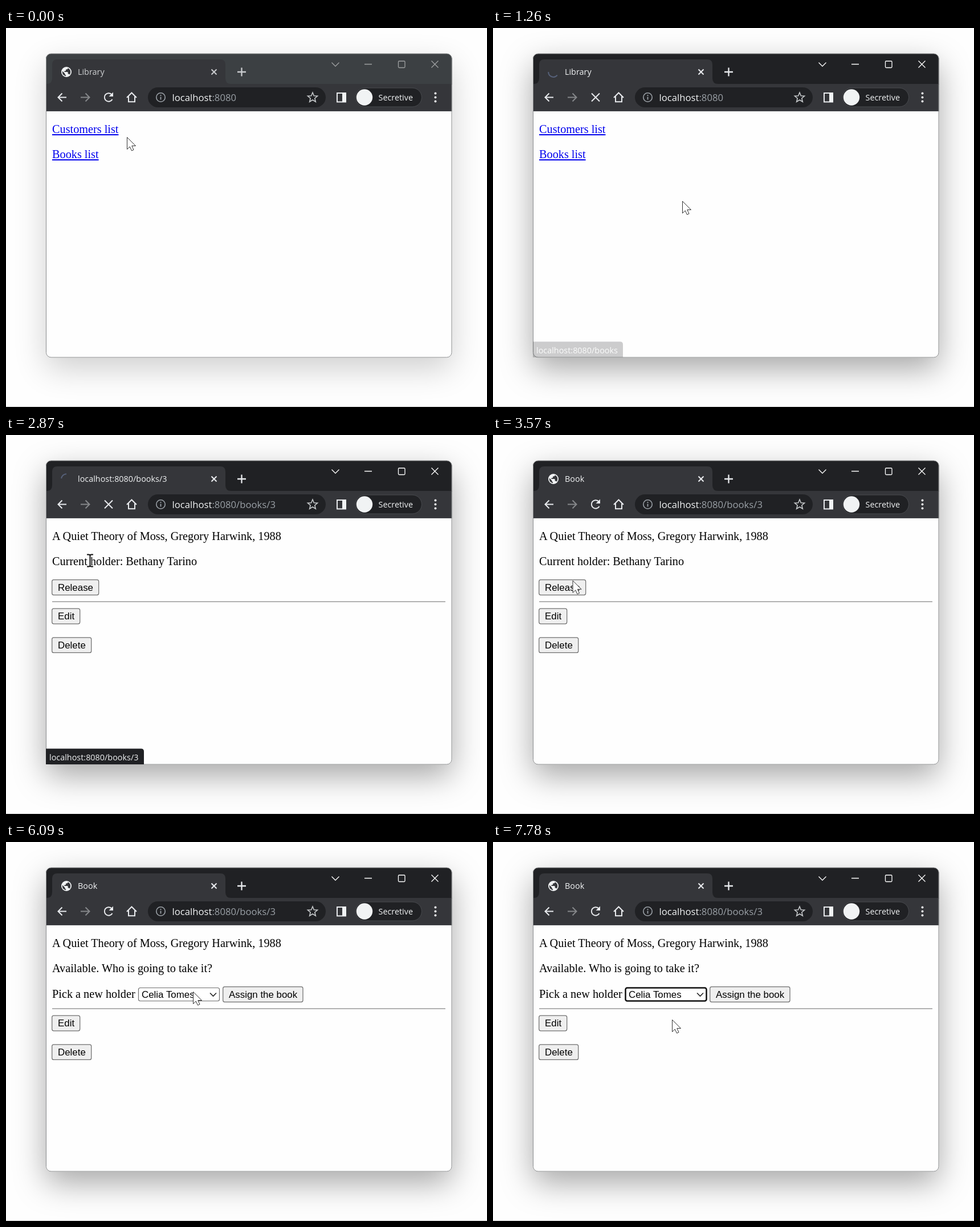
Write an HTML page that moves like this. It is 844 by 664 pixels and loops after 8 s.

```html
<!DOCTYPE html>
<html lang="en">
<head>
<meta charset="utf-8">
<title>Library</title>
<style>
html, body { margin: 0; width: 100%; height: 100%; overflow: hidden; background: #fefefe; }
#stage { position: relative; width: 844px; height: 664px; overflow: hidden; }
.shadow { position: absolute; left: 70px; top: 45px; width: 712px; height: 532px; border-radius: 9px; }
#idle { box-shadow: 0 20px 55px rgba(0,0,0,.19); }
#active { box-shadow: 0 20px 55px rgba(0,0,0,.35); }
svg { position: absolute; left: 0; top: 0; }
.page text { font: 20.25px "Liberation Serif", Tinos, serif; }
.page .ui, #popup text { font: 16.9px "Liberation Sans", Arimo, sans-serif; }
.chrome text { font: 14.4px "Open Sans", "Noto Sans", sans-serif; fill: #f1f3f4; }
.chrome .url { font-size: 16.7px; }
.link { fill: #0000ee; text-decoration: underline; }
.link.hit { fill: #ff0000; }
.line { fill: none; stroke: #e8eaed; stroke-width: 2; }
.rule { stroke: #999; stroke-width: 1.4; }
.btn { fill: #efefef; stroke: #6f6f6f; stroke-width: 1.25; }
</style>
</head>
<body>
<div id="stage">
<div class="shadow" id="idle"></div>
<div class="shadow" id="active"></div>
<svg width="844" height="664" viewBox="0 0 844 664">
  <defs><clipPath id="frame"><rect x="70" y="45" width="712.5" height="532.5" rx="9"/></clipPath></defs>
  <path d="M0 663.5H844" stroke="#ccc"/>
  <g clip-path="url(#frame)">
    <rect x="70" y="45" width="713" height="533" fill="#fefefe"/>
    <g class="chrome">
      <rect x="70" y="45" width="713" height="54" fill="#202124"/>
      <rect id="dim" x="70" y="45" width="713" height="54" fill="#3c4043"/>
      <path d="M71 98q10 0 10-10V64q0-9 9-9H376q9 0 9 9V88q0 10 10 10Z" fill="#35363a"/>
      <rect x="70" y="98" width="713" height="47" fill="#35363a"/>
      <path d="M70 145.5H783" stroke="#4a4c50"/>
      <g id="globe" transform="translate(95.2 66.2) scale(.9)">
        <circle cx="12" cy="12" r="10" fill="#f1f3f4"/>
        <path d="M11 20Q4 18.500 4 12L4.200 10.200 9 15v1q0 2 2 2ZM18 17.400q-.5-1.400-2-1.400h-1v-3q0-1-1-1H8v-2h2q1 0 1-1V7h2q2 0 2-2.400Q20 7 20 12 20 15 18 17.400Z" fill="#35363a"/>
      </g>
      <path id="spin" class="line" style="stroke:#56617a"/>
      <g id="tab">
        <text id="title" x="126" y="82"></text>
        <path class="line" d="M360.500 72.500l9 9m0-9l-9 9"/>
        <path class="line" style="stroke-width:2.300" d="M406 77h15M413.500 69.500v15"/>
      </g>
      <g id="controls" class="line" style="stroke:#fff;stroke-width:1.300">
        <path d="M571.500 60.500l6.500 6.500 6.500-6.500M629 63.500h13M746.500 57.500l12 12m0-12l-12 12"/>
        <rect x="688.500" y="58" width="11.500" height="11.500" rx="1.500"/>
      </g>
      <path class="line" d="M106 121.500H92M98.500 114.500l-7 7 7 7"/>
      <path id="fwd" class="line" d="M131 121.500H146M139.500 114.500l7 7-7 7"/>
      <g id="reload">
        <path class="line" d="M186.500 125A7.300 7.300 0 1 1 185 116"/>
        <path d="M188 112.500v7.500h-7.500Z" fill="#e8eaed"/>
      </g>
      <path id="stop" class="line" d="M173 114.500l14 14m0-14l-14 14"/>
      <path class="line" d="M212 122l8.500-8.500 8.500 8.500M215 120v9.300h11V120"/>
      <rect x="249" y="104" width="312" height="35" rx="17.500" fill="#202124"/>
      <circle class="line" style="stroke:#9aa0a6;stroke-width:1.600" cx="271.500" cy="121.500" r="7.700"/>
      <path d="M271.500 120.500v5M271.500 117v2" stroke="#9aa0a6" stroke-width="1.800"/>
      <text class="url" x="291.500" y="127.500">localhost<tspan id="path" fill="#9aa0a6"></tspan></text>
      <path id="star" class="line" style="stroke:#c4c7c9;stroke-width:1.600"/>
      <rect class="line" x="581" y="114" width="15" height="15.500"/>
      <rect x="590" y="113" width="7" height="17" fill="#f1f3f4"/>
      <rect x="613.500" y="105" width="116" height="33" rx="16.500" fill="#202124" stroke="#484a4e"/>
      <circle cx="629" cy="121.500" r="14.200" fill="#f1f3f4"/>
      <text x="653.500" y="127">Secretive</text>
      <g fill="#f1f3f4"><circle cx="753.500" cy="114.500" r="2"/><circle cx="753.500" cy="121.500" r="2"/><circle cx="753.500" cy="128.500" r="2"/></g>
    </g>

    <g class="page" id="home">
      <text class="link" x="81" y="184">Customers list</text>
      <text class="link" id="booksLink" x="81" y="228">Books list</text>
    </g>
    <g class="page" id="list"><path class="rule" d="M81 331H771"/></g>
    <g class="page" id="book">
      <text x="81" y="184" id="heading"></text>
      <path class="rule" d="M81 292H771"/>
      <g id="held">
        <text x="81" y="228">Current holder: Bethany Tarino</text>
        <rect class="btn" id="release" x="80.700" y="253.700" width="82" height="26.600" rx="3"/>
        <text class="ui" x="91" y="272.500">Release</text>
      </g>
      <g id="free">
        <text x="81" y="228">Available. Who is going to take it?</text>
        <text x="81" y="273">Pick a new holder</text>
        <rect id="select" x="232.500" y="255.500" width="142" height="23" rx="3"/>
        <text class="ui" x="238" y="272.500">Celia Tomes</text>
        <path d="M358 264.500l5.500 5.500 5.500-5.500" fill="none" stroke="#222" stroke-width="1.600"/>
        <rect class="btn" x="380.700" y="253.700" width="140.300" height="26.600" rx="3"/>
        <text class="ui" x="391" y="272.500">Assign the book</text>
      </g>
      <rect class="btn" x="80.700" y="304.200" width="49" height="26.600" rx="3"/>
      <text class="ui" x="91" y="323">Edit</text>
      <rect class="btn" x="80.700" y="354.800" width="69" height="26.600" rx="3"/>
      <text class="ui" x="91" y="373.500">Delete</text>
    </g>
    <g id="popup">
      <rect x="232.500" y="279.500" width="143" height="64" fill="#fff" stroke="#777" style="filter:drop-shadow(0 10px 9px rgba(0,0,0,.3))"/>
      <g id="options">
        <rect x="233" y="301" width="142" height="21" fill="#1967d2"/>
        <text x="238" y="296.500">Bethany Tarino</text>
        <text x="238" y="317.500" fill="#fff">Celia Tomes</text>
        <text x="238" y="338.500">Marcus Webley</text>
      </g>
    </g>
  </g>
  <rect x="70.500" y="45" width="711.500" height="532" rx="8.500" fill="none" stroke="#8b8d8e"/>
  <g class="chrome" id="status">
    <path id="bubble" fill="#202124"/>
    <text id="target" x="76" y="569.500"></text>
  </g>
  <g id="cursor" stroke-linejoin="round">
    <path id="arrow" d="M.5 .5V21.500L5.300 17 8.500 24 12 22.400 8.800 15.500H15.500Z" fill="#fff" stroke="#333"/>
    <g id="hand" fill="#fff" stroke="#333" transform="translate(-1.500 -1)">
      <path d="M0 15V1.500a2 2 0 0 1 4 0V10a1.800 1.800 0 0 1 3.500 0v1a1.700 1.700 0 0 1 3 .3v1a1.300 1.300 0 0 1 2.500 .5V20q0 4-2 7.500H2L-3.700 18a2 2 0 0 1 3-2.500Z"/>
      <path d="M4 10v5M7.500 11v4M10.500 12v3" fill="none"/>
    </g>
    <g id="beam" fill="none">
      <path d="M-5-9.500h3.500l2 1 2-1H6M-5 11.500h3.500l2-1 2 1H6M.5-9v20" stroke="#fff" stroke-width="4"/>
      <path d="M-5-9.500h3.500l2 1 2-1H6M-5 11.500h3.500l2-1 2 1H6M.5-9v20" stroke="#111" stroke-width="2"/>
    </g>
    <circle id="click" r="16" fill="#ffd514" fill-opacity=".7"/>
  </g>
</svg>
</div>
<script>
const $ = id => document.getElementById(id);
const show = (id, on) => { $(id).style.display = on ? '' : 'none'; };
const within = (t, a, b) => t >= a && t < b;
const ramp = (t, a, b) => Math.min(1, Math.max(0, (t - a) / (b - a)));
const ease = u => u * u * (3 - 2 * u);

const LOOP = 8000, CHOSEN = 'A Quiet Theory of Moss, Gregory Harwink, 1988';
const HOME_END = 1480, BOOK_OPEN = 2700, FREED = 5190;
const rows = ['Find a book', 'To Hold a Lanternbird, Hester Lyn, 1960', CHOSEN,
  'Storm and Banishment, Bogdan Goretinsky, 1866', 'Nona Halonina, Ian Dorsloy, 1877',
  'The Heir of the Reeds Novel, I. B. B. Farsden, 1954', 'Nimble Rituals, Jonas Plore, 2018'];

// time, x, y of the pointer
const moves = [[70, 212, 191], [460, 141, 225], [1259, 141, 225], [1260, 332, 303], [1310, 332, 303],
  [1980, 147, 219], [3120, 147, 219], [3730, 138, 262], [4760, 138, 262], [5150, 328, 262],
  [6090, 328, 262], [6330, 346, 287], [6500, 367, 275], [6620, 360, 264], [7229, 360, 264],
  [7230, 352, 263], [7510, 352, 263], [7620, 314, 311]];
const clicks = [[1040, 1260], [2270, 2480], [4130, 4350], [7000, 7230], [7620, 7780]];
// shown from, shown until, start of the sweep
const loads = [[1260, HOME_END, 777], [2730, 2950, 2730], [4550, 5410, 4550]];

function addLink(label, y) {
  const el = document.createElementNS('http://www.w3.org/2000/svg', 'text');
  el.setAttribute('class', 'link');
  el.setAttribute('x', 81);
  el.setAttribute('y', y);
  el.textContent = label;
  $('list').append(el);
  return el;
}
const links = rows.map((label, i) => addLink(label, Math.round(174 + i * 23.55)));
addLink('Add new book', 362);
$('heading').textContent = CHOSEN;

const starPoints = Array.from({ length: 10 }, (_, i) => {
  const a = (i / 5 - .5) * Math.PI, r = i % 2 ? 4 : 9;
  return `${538 + r * Math.cos(a)} ${122 + r * Math.sin(a)}`;
});
$('star').setAttribute('d', `M${starPoints.join('L')}Z`);

function pointerAt(t) {
  const i = moves.findIndex(m => m[0] > t);
  if (i === 0) return moves[0].slice(1);
  if (i < 0) return moves.at(-1).slice(1);
  const [a, x0, y0] = moves[i - 1], [b, x1, y1] = moves[i];
  const u = ease(ramp(t, a, b));
  return [x0 + (x1 - x0) * u, y0 + (y1 - y0) * u];
}

function drawSpinner(age) {
  const tail = Math.max(0, age - 150) * .27, head = tail + Math.min(140, age * .6);
  const point = deg => {
    const a = deg * Math.PI / 180;
    return `${106 - 8.8 * Math.sin(a)} ${77 - 8.8 * Math.cos(a)}`;
  };
  $('spin').setAttribute('d', `M${point(tail)}A8.8 8.8 0 0 0 ${point(head)}`);
}

function drawChrome(t) {
  const focus = ramp(t, 630, 800);
  $('dim').style.opacity = 1 - focus;
  $('active').style.opacity = focus;
  $('idle').style.opacity = 1 - focus;
  $('controls').style.opacity = .5 + .5 * focus;
  $('tab').style.opacity = .82 + .18 * focus;

  const load = loads.find(([a, b]) => within(t, a, b));
  show('spin', load);
  show('stop', load);
  show('globe', !load);
  show('reload', !load);
  if (load) drawSpinner(t - load[2]);

  const path = t < HOME_END ? '' : t < BOOK_OPEN ? '/books' : '/books/3';
  $('path').textContent = ':8080' + path;
  $('title').textContent = t < HOME_END ? 'Library' : t < BOOK_OPEN ? 'Books'
    : t < 2950 ? 'localhost:8080/books/3' : 'Book';
  $('fwd').style.stroke = within(t, HOME_END, BOOK_OPEN) ? '#e8eaed' : '#85878a';

  const first = t < 2000, right = first ? 228 : 242;
  $('target').textContent = 'localhost:8080/books' + (first ? '' : '/3');
  $('bubble').setAttribute('d', `M70 577V549.5H${right - 5}q5 0 5 5V577Z`);
  $('status').style.opacity = first
    ? ramp(t, 760, 960) * (t < 1260 ? 1 : .22 * (1 - ramp(t, 1300, 1400)))
    : ramp(t, 2100, 2230) * (1 - ramp(t, 3120, 3300));
}

function drawPage(t) {
  show('home', t < HOME_END);
  show('list', within(t, HOME_END, BOOK_OPEN));
  show('book', t >= BOOK_OPEN);
  show('held', t < FREED);
  show('free', t >= FREED);
  $('booksLink').classList.toggle('hit', within(t, 1040, 1260));
  links[2].classList.toggle('hit', within(t, 2270, 2480));

  const hover = t > 3600, pressed = within(t, 4130, 4350);
  $('release').style.fill = pressed ? '#f5f5f5' : hover ? '#e5e5e5' : '';
  $('release').style.stroke = pressed ? '#8d8d8d' : hover ? '#4f4f4f' : '';
  const focused = t >= 7000;
  $('select').setAttribute('style', `fill:#fff;stroke:${focused ? '#101010' : '#6f6f6f'};stroke-width:${focused ? 2.5 : 1.2}`);
  show('popup', within(t, 7070, 7780));
  show('options', t >= 7230);
}

function drawPointer(t) {
  const [x, y] = pointerAt(t);
  const shape = within(t, 360, 1260) || within(t, HOME_END, BOOK_OPEN) ? 'hand'
    : within(t, BOOK_OPEN, 3350) ? 'beam' : 'arrow';
  ['arrow', 'hand', 'beam'].forEach(id => show(id, id === shape));
  $('cursor').setAttribute('transform', `translate(${x} ${y})`);
  show('click', clicks.some(([a, b]) => within(t, a, b)));
}

function frame() {
  const t = performance.now() % LOOP;
  drawChrome(t);
  drawPage(t);
  drawPointer(t);
  requestAnimationFrame(frame);
}
frame();
</script>
</body>
</html>
```
